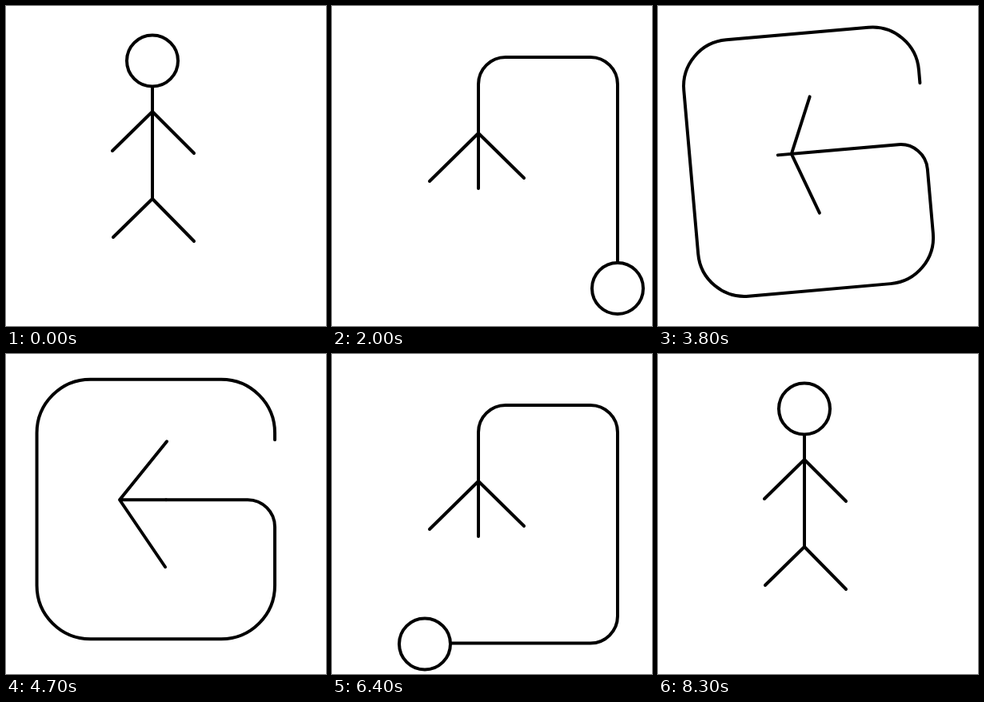
These frames come from a looping animation (400 by 400 pixels, 8.8 s). An HTML page:

```html
<!DOCTYPE html>
<html lang="en">
<head>
<meta charset="utf-8">
<title>Stick figure loop</title>
<style>
html, body { margin: 0; width: 100%; height: 100%; overflow: hidden; background: #fff; }
svg { display: block; width: 100vw; height: 100vh; }
</style>
</head>
<body>
<svg viewBox="0 0 400 400" fill="none" stroke="#000" stroke-width="4" stroke-linecap="round" stroke-linejoin="round">
  <g id="figure">
    <path id="neck"/>
    <path id="limbs"/>
    <circle id="head" r="32" fill="#fff"/>
  </g>
</svg>
<script>
const [figure, neck, limbs, head] = ['figure', 'neck', 'limbs', 'head'].map(id => document.getElementById(id));
const STEP = 100, STEPS = 88;
const MID = [194.75, 212.75];

// Head positions, one per step, beginning at step 10
const headWay = [
  [183, 68.5], [190, 66], [205, 64], [225, 64], [247, 64], [283, 64],
  [322, 66], [350, 112], [360, 196], [357, 278], [357, 353], [285, 362],
  [200, 362], [116, 362.5], [34, 340], [34, 252], [34, 164], [34, 75]
];
// Turn in degrees, one per step, beginning at step 30
const turns = [11, 22, 42, 54, 64, 71, 77, 81, 85, 88, 90, 90];

const clamp = v => Math.max(0, Math.min(1, v));
const ramp = (i, a, b) => clamp((i - a) / (b - a));
const mix = (a, b, p) => a + (b - a) * p;
const mixPt = (a, b, p) => [mix(a[0], b[0], p), mix(a[1], b[1], p)];

function neckPath(r) {
  const arc = (x, y) => `A${r} ${r} 0 0 1 ${x} ${y}`;
  return `M183 200V98A34 34 0 0 1 217 64H${357 - r}${arc(357, 64 + r)}` +
    `V${361.5 - r}${arc(357 - r, 361.5)}H${32.5 + r}${arc(32.5, 361.5 - r)}` +
    `V${64 + r}${arc(32.5 + r, 64)}H108`;
}

// Length along the neck that lies closest to each head position
neck.setAttribute('d', neckPath(34));
const total = neck.getTotalLength();
const reach = headWay.map(([x, y]) => {
  let best = 0, min = Infinity;
  for (let s = 0; s < total; s += 2) {
    const p = neck.getPointAtLength(s);
    const d = Math.hypot(p.x - x, p.y - y);
    if (d < min) { min = d; best = s; }
  }
  return best;
});

function stepAt(k) {
  if (k < 3 || k >= 83) return 0;
  return k < 47 ? Math.min(k, 41) : 87 - k;
}

function placeFigure(i) {
  const deg = i < 30 ? 0 : turns[i - 30];
  const scale = 1 - 0.125 * Math.pow(Math.abs(Math.sin(deg * Math.PI / 90)), 1.5);
  const [x, y] = deg < 22
    ? mixPt(MID, [198, 204], deg / 22)
    : mixPt([198, 204], [187.3, 194], (deg - 22) / 68);
  figure.setAttribute('transform',
    `translate(${x} ${y}) rotate(${deg}) scale(${scale}) translate(${-MID[0]} ${-MID[1]})`);
}

function drawLimbs(i, morph) {
  const slide = ramp(i, 5, 10);
  const bend = ramp(i, 2, 4);
  const shoulder = mix(mix(132, 159, slide), 258, morph);
  const handL = mixPt(mixPt([133, 181], [122, 219], slide), [110, 199], morph);
  const handR = mixPt(mixPt([235, 184], [240, 215], slide), [267, 201], morph);

  let hip = mix(241, 224, bend);
  let footL = mixPt(mixPt([134, 289], [136, 296], bend), [183, 310], slide);
  let footR = mixPt([235, 294], [183, 310], slide);
  if (i > 10) {
    hip = mix(mix(310, 228, ramp(i, 10, 14)), 258, morph);
    footL = footR = [183, hip];
  }
  limbs.setAttribute('d',
    `M183 ${Math.min(200, shoulder)}V${hip}M${handL}L183 ${shoulder}L${handR}M${footL}L183 ${hip}L${footR}`);
}

function draw(ms) {
  const i = stepAt(Math.floor(ms / STEP) % STEPS);
  const morph = ramp(i, 32, 40);
  const n = Math.max(0, i - 10);
  const hasHead = n < headWay.length;

  placeFigure(i);
  drawLimbs(i, morph);
  neck.setAttribute('d', neckPath(mix(34, 67, morph)));
  neck.setAttribute('stroke-dasharray', hasHead ? `${reach[n]} 3000` : 'none');
  head.setAttribute('visibility', hasHead ? 'visible' : 'hidden');
  if (hasHead) {
    head.setAttribute('cx', headWay[n][0]);
    head.setAttribute('cy', headWay[n][1]);
  }
}

const start = performance.now();
function tick() {
  draw(performance.now() - start);
  requestAnimationFrame(tick);
}
tick();
</script>
</body>
</html>
```
